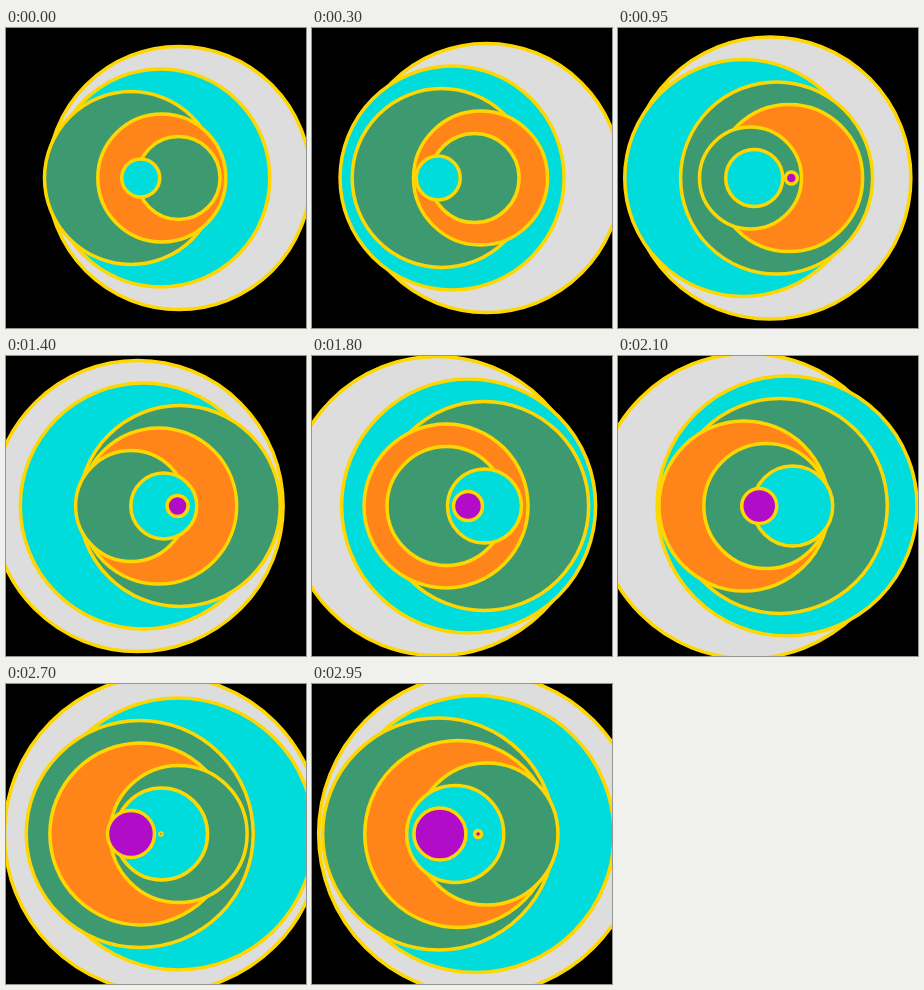
An HTML page with a canvas for the animation above (3 s loop, 300 px wide and 300 px high).

```html
<!DOCTYPE html>
<html lang="en">
<head>
<meta charset="utf-8">
<title>Swaying circles</title>
<style>
  html, body { margin: 0; width: 100%; height: 100%; overflow: hidden; background: #000; }
  canvas { display: block; }
</style>
</head>
<body>
<canvas id="stage" width="300" height="300"></canvas>
<script>
const ctx = document.getElementById("stage").getContext("2d");
const GREY = "#dddddd", CYAN = "#00dcdc", GREEN = "#3d9970", ORANGE = "#ff851b", PURPLE = "#b10dc9";
const fills = [GREY, CYAN, GREEN, ORANGE, GREEN, CYAN, PURPLE, PURPLE];
const STEP_MS = 50, STEPS = 60;
const FIRST_RADIUS = 131.5, GAP = 22.5, GROWTH = 0.5;

function draw(step) {
  ctx.fillStyle = "#000";
  ctx.fillRect(0, 0, 300, 300);
  ctx.strokeStyle = "#ffd700";
  ctx.lineWidth = 3.5;
  fills.forEach((fill, i) => {
    const r = FIRST_RADIUS - GAP * i + GROWTH * step;
    if (r <= 0) return;
    // Each circle sways sideways as it grows
    ctx.beginPath();
    ctx.arc(150 + 25 * Math.sin(r / 5), 150, r, 0, 2 * Math.PI);
    ctx.fillStyle = fill;
    ctx.fill();
    ctx.stroke();
  });
}

const start = performance.now();
function tick() {
  draw(Math.floor((performance.now() - start) / STEP_MS) % STEPS);
  requestAnimationFrame(tick);
}
tick();
</script>
</body>
</html>
```
